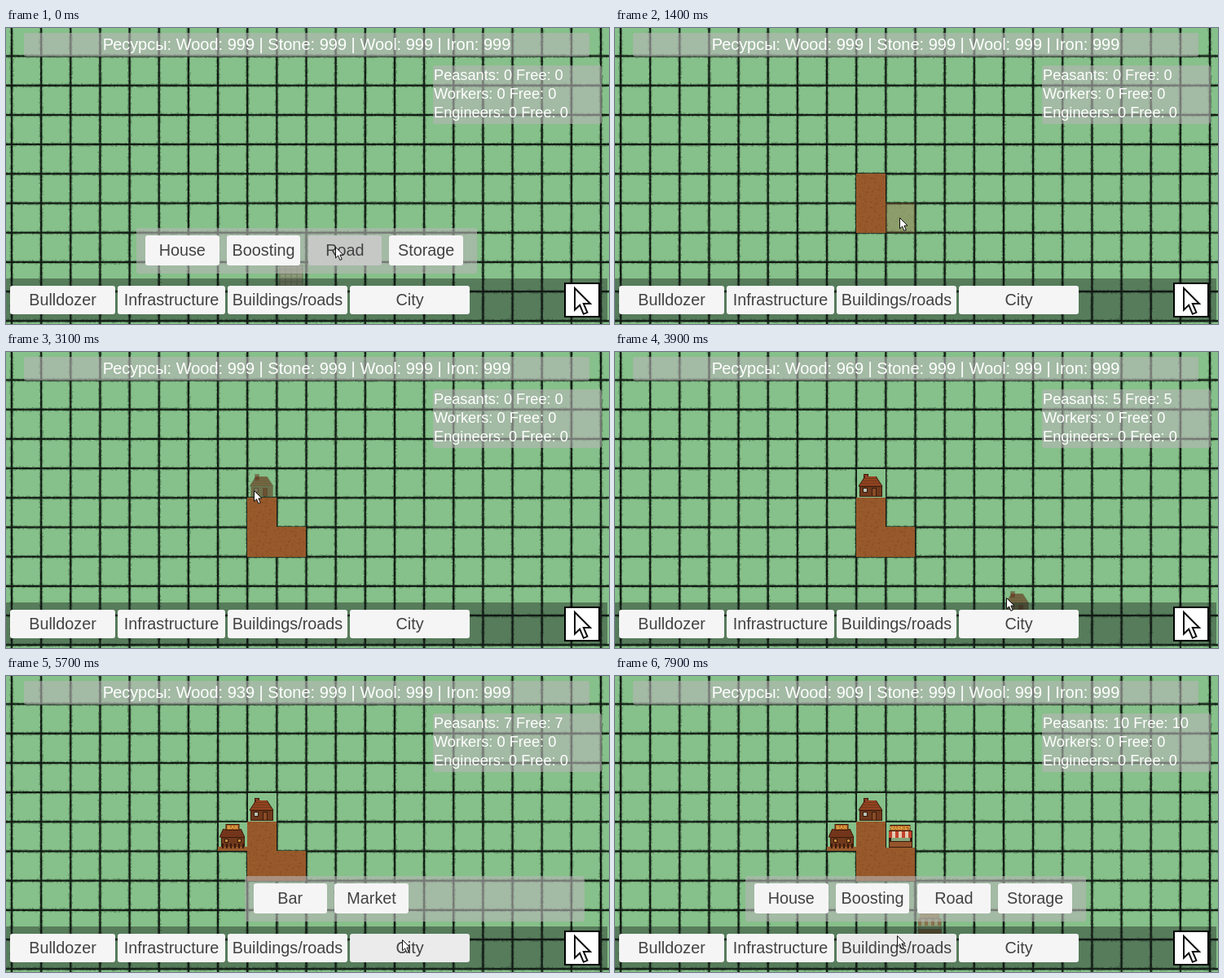
An HTML page with a canvas that plays this animation: 740 by 364 pixels, repeating every 8000 ms.

```html
<!DOCTYPE html>
<html lang="en">
<head>
<meta charset="utf-8">
<title>City builder</title>
<style>
html, body { margin: 0; width: 740px; height: 364px; overflow: hidden; }
#stage { position: relative; width: 740px; height: 364px; overflow: hidden; background: #86c08a;
  font: 19.8px "Liberation Sans", Arial, sans-serif; }
#stage > *, .menu > * { position: absolute; box-sizing: border-box; }
.panel { background: rgba(184, 182, 182, .6); border-radius: 3px; color: #fff; white-space: pre; }
.menu { left: 0; top: 0; }
.btn { background: #f5f5f5; color: #424242; border-radius: 3px; text-align: center; white-space: nowrap; }
.btn.over { background: #ebebeb; }
.btn.down { background: #c6c8c6; }
#bar { left: 0; top: 308px; width: 738px; height: 52px; background: rgba(15, 20, 20, .4); }
#title { text-align: center; line-height: 28px; font-size: 20px; }
#info { font-size: 18.2px; line-height: 22.7px; padding: 1.3px 0 0 1px; }
#tool { left: 685px; top: 313px; width: 44px; height: 43px; background: #fff; border: 2px solid #000; }
svg { overflow: visible; fill: #fff; stroke: #111; }
#big { left: 697px; top: 319px; stroke-width: 1; }
#mouse { left: 0; top: 0; stroke-width: 1; }
</style>
</head>
<body>
<div id="stage">
  <canvas id="map" width="740" height="364"></canvas>
  <div id="bar"></div>
  <div id="title" class="panel"></div>
  <div id="info" class="panel"></div>
  <div id="tool"></div>
  <svg id="big" width="22" height="32" viewBox="0 0 11 16"><use href="#arrow"/></svg>
  <svg id="mouse" width="12" height="18"><path id="arrow" d="M.5.5V13.8L3.6 10.9 5.9 16.4 8.2 15.4 5.9 10H10Z"/></svg>
</div>
<script>
const STEP = 100, FRAMES = 80, CELL_W = 36.15, CELL_H = 36.2, X0 = 7, Y0 = 34.5;
const $ = id => document.getElementById(id);
const stage = $('stage'), ctx = $('map').getContext('2d');

// Pointer stops: ms, x, y. Each is a click unless marked as a hover.
const stops = [
  [0, 404, 269], [700, 314, 196], [1000, 314, 230], [1500, 349, 233],
  [2300, 345, 326], [2700, 214, 268], [3200, 304, 170],
  [4100, 484, 324], [4800, 359, 267], [5200, 278, 197],
  [5600, 486, 324], [6100, 445, 268], [6600, 347, 198],
  [7000, 346, 218, 'hover'], [7400, 386, 303, 'hover'], [7700, 346, 319]
];

// The pointer rests one step at each stop; sideways motion leads, vertical motion trails.
function mouseAt(t) {
  const i = stops.findIndex(s => s[0] > t);
  if (i < 0) return stops[stops.length - 1].slice(1);
  const [ta, xa, ya] = stops[i - 1], [tb, xb, yb] = stops[i];
  const f = Math.min(1, Math.max(0, (t - ta - STEP) / (tb - ta - 2 * STEP)));
  return [xa + (xb - xa) * (1 - (1 - f) ** 2), ya + (yb - ya) * f];
}

const inside = ([x, y], [l, t, w, h]) => x >= l && x < l + w && y >= t && y < t + h;
const cellAt = ([x, y]) => [Math.floor((x - X0) / CELL_W), Math.floor((y - Y0) / CELL_H)];

// Interface
function place(el, [x, y, w, h]) {
  el.style.cssText += `;left:${x}px;top:${y}px;width:${w}px;height:${h}px`;
}

function addDiv(parent, className, area) {
  const el = document.createElement('div');
  el.className = className;
  if (area) place(el, area);
  parent.insertBefore(el, parent === stage ? $('mouse') : null);
  return el;
}

const buttons = [];
function addButton(parent, spec, area) {
  const el = addDiv(parent, 'btn', area);
  el.textContent = spec.label;
  el.style.lineHeight = area[3] + 'px';
  buttons.push({ el, area, ...spec });
}

const menus = {
  build: { area: [160, 246, 417.5, 56], items: ['House', 'Boosting', 'Road', 'Storage'], left: 171 },
  city: { area: [293, 246, 416.5, 56], items: ['Bar', 'Market'], left: 303.5 }
};
for (const name in menus) {
  const m = menus[name];
  m.el = addDiv(stage, 'menu');
  addDiv(m.el, 'panel', m.area);
  m.items.forEach((label, i) =>
    addButton(m.el, { label, owner: name, tool: label.toLowerCase() }, [m.left + i * 99.8, 255, 90.5, 37]));
}

const mainMenu = addDiv(stage, 'menu');
let left = 5;
for (const [label, width, opens] of [['Bulldozer', 129], ['Infrastructure', 132],
  ['Buildings/roads', 147, 'build'], ['City', 147, 'city']]) {
  addButton(mainMenu, { label, opens }, [left, 317, width, 35]);
  left += width + 3;
}

const titleArea = [22, 6, 694, 29], infoArea = [524, 46, 207, 72];
place($('title'), titleArea);
place($('info'), infoArea);

// Game rules
const settlers = { road: 0, house: 5, bar: 2, market: 3 };
const isFree = (built, [col, row]) => !built.some(b => b.col === col && b.row === row);
const hitButton = (menu, pos) => buttons.find(b => (!b.owner || b.owner === menu) && inside(pos, b.area));
const onMap = (menu, pos) => pos[1] < 308 && !inside(pos, titleArea) && !inside(pos, infoArea)
  && !(menu && inside(pos, menus[menu].area));

function click(s, pos) {
  const button = hitButton(s.menu, pos), [col, row] = cellAt(pos);
  if (button && button.opens) return { ...s, menu: button.opens };
  if (button && button.tool) return { ...s, menu: '', tool: button.tool };
  if (onMap(s.menu, pos) && isFree(s.built, [col, row]))
    return { ...s, built: [...s.built, { kind: s.tool, col, row }] };
  return s;
}

const states = [];
let state = { menu: 'build', tool: 'storage', built: [], cell: [9, 7] };
for (let t = 0; t < FRAMES * STEP; t += STEP) {
  const pos = mouseAt(t);
  if (onMap(state.menu, pos)) state = { ...state, cell: cellAt(pos) };
  const pressed = stops.some(s => s[0] === t && !s[3]);
  states.push({ ...state, pos, pressed });
  if (pressed) state = click(state, pos);
}

// Map
let seed = 1;
const rnd = () => (seed = seed * 16807 % 2147483647) / 2147483647;

function makeGround() {
  const c = document.createElement('canvas');
  c.width = 740; c.height = 364;
  const g = c.getContext('2d');
  g.fillStyle = '#86c08a';
  g.fillRect(0, 0, 740, 364);
  const dash = (upright, pos, s, w) =>
    upright ? g.fillRect(pos - w / 2, s, w, 2) : g.fillRect(s, pos - w / 2, 2, w);
  const line = (upright, pos) => {
    for (let s = 0; s < 740; s += 2) {
      g.fillStyle = 'rgba(35,65,42,.4)';
      dash(upright, pos + rnd() - .5, s, 3 + rnd() * 2);
      g.fillStyle = '#101912';
      dash(upright, pos, s, 1.7 + rnd() * .6);
    }
  };
  for (let x = X0; x < 740; x += CELL_W) line(true, x);
  for (let y = Y0; y < 364; y += CELL_H) line(false, y);
  return c;
}
const ground = makeGround();

const DARK = '#3a1a0c', WOOD = '#70391c', SOIL = '#97592b';
const box = (color, x, y, w, h) => { ctx.fillStyle = color; ctx.fillRect(x, y, w, h); };
const framed = (color, x, y, w, h) => { box(DARK, x, y, w, h); box(color, x + 1, y + 1, w - 2, h - 2); };

// Roof drawn in rows that widen downwards.
function roof(color, top, rows, width, grow) {
  for (let i = 0; i < rows; i++) {
    const w = width + i * grow;
    box(DARK, 17.5 - w / 2, top + i, w, 1.5);
    box(i % 3 === 2 ? WOOD : color, 18.5 - w / 2, top + i, w - 2, 1);
  }
}

function sign(text, y, w) {
  framed('#a85a20', 18 - w / 2, y, w, 8);
  ctx.fillStyle = '#f3c65a';
  ctx.font = 'bold 6px "Liberation Sans", sans-serif';
  ctx.textAlign = 'center';
  ctx.fillText(text, 18, y + 6.2);
}

const sprites = {
  road() {
    seed = 77;
    box(SOIL, 0, 0, 36, 37);
    for (let i = 0; i < 140; i++)
      box(i % 2 ? 'rgba(70,35,10,.13)' : 'rgba(190,120,70,.13)', rnd() * 34.5, rnd() * 35, 1.6, 1.6);
  },
  house() {
    framed('#8a3a20', 9, 7, 6, 8);
    roof('#94421f', 10, 12, 15, 1.3);
    framed(WOOD, 4, 22, 28, 13);
    framed('#b9c4b8', 8, 24, 6, 6);
    framed('#8a4c26', 19, 24, 6, 11);
  },
  bar() {
    roof('#74331a', 9, 10, 23, .9);
    sign('BAR', 3, 17);
    framed(WOOD, 4, 19, 29, 13);
    for (const x of [8, 24]) framed('#c58d3c', x, 21, 5, 5);
    box(SOIL, 0, 31, 36, 5);
    for (let x = 5; x < 33; x += 5) box(DARK, x, 27, 2, 6);
  },
  market() {
    box(DARK, 4, 11, 29, 21);
    box('#86a578', 7, 20, 23, 5);
    for (let i = 0; i < 7; i++) box(i % 2 ? '#e3cbb0' : '#c2432c', 4 + i * 4, 12, 4, 8);
    sign('MARKET', 4, 25);
    framed('#95552c', 4, 24, 29, 8);
    box(SOIL, 0, 32, 36, 4);
  },
  storage() {
    framed('#8d8a74', 3, 4, 30, 28);
    for (let i = 0; i < 20; i++) box('#b9b49d', 5 + i % 4 * 7, 6 + (i >> 2) * 5, 5, 3.5);
  }
};

function drawTile(kind, col, row, alpha) {
  ctx.save();
  ctx.translate(Math.floor(X0 + col * CELL_W), Math.floor(Y0 + row * CELL_H));
  if (alpha === 1) box('#86c08a', 1, 1, 35, 35);
  ctx.globalAlpha = alpha;
  sprites[kind]();
  ctx.restore();
}

function render({ menu, tool, built, cell, pos, pressed }) {
  ctx.drawImage(ground, 0, 0);
  for (const b of built) drawTile(b.kind, b.col, b.row, 1);
  if (isFree(built, cell)) drawTile(tool, ...cell, .33);

  const wood = 999 - 30 * built.filter(b => b.kind !== 'road').length;
  const people = built.reduce((sum, b) => sum + settlers[b.kind], 0);
  $('title').textContent = `Ресурсы: Wood: ${wood} | Stone: 999 | Wool: 999 | Iron: 999`;
  $('info').textContent = `Peasants: ${people} Free: ${people}\nWorkers: 0 Free: 0\nEngineers: 0 Free: 0`;

  for (const name in menus) menus[name].el.style.display = name === menu ? '' : 'none';
  const hit = hitButton(menu, pos);
  for (const b of buttons) b.el.className = 'btn' + (b !== hit ? '' : pressed ? ' down' : ' over');
  $('mouse').style.transform = `translate(${Math.round(pos[0])}px,${Math.round(pos[1])}px)`;
}

let last = -1;
const start = performance.now();
function tick() {
  const k = Math.floor(Math.max(0, performance.now() - start) / STEP) % FRAMES;
  if (k !== last) render(states[last = k]);
  requestAnimationFrame(tick);
}
tick();
</script>
</body>
</html>
```
